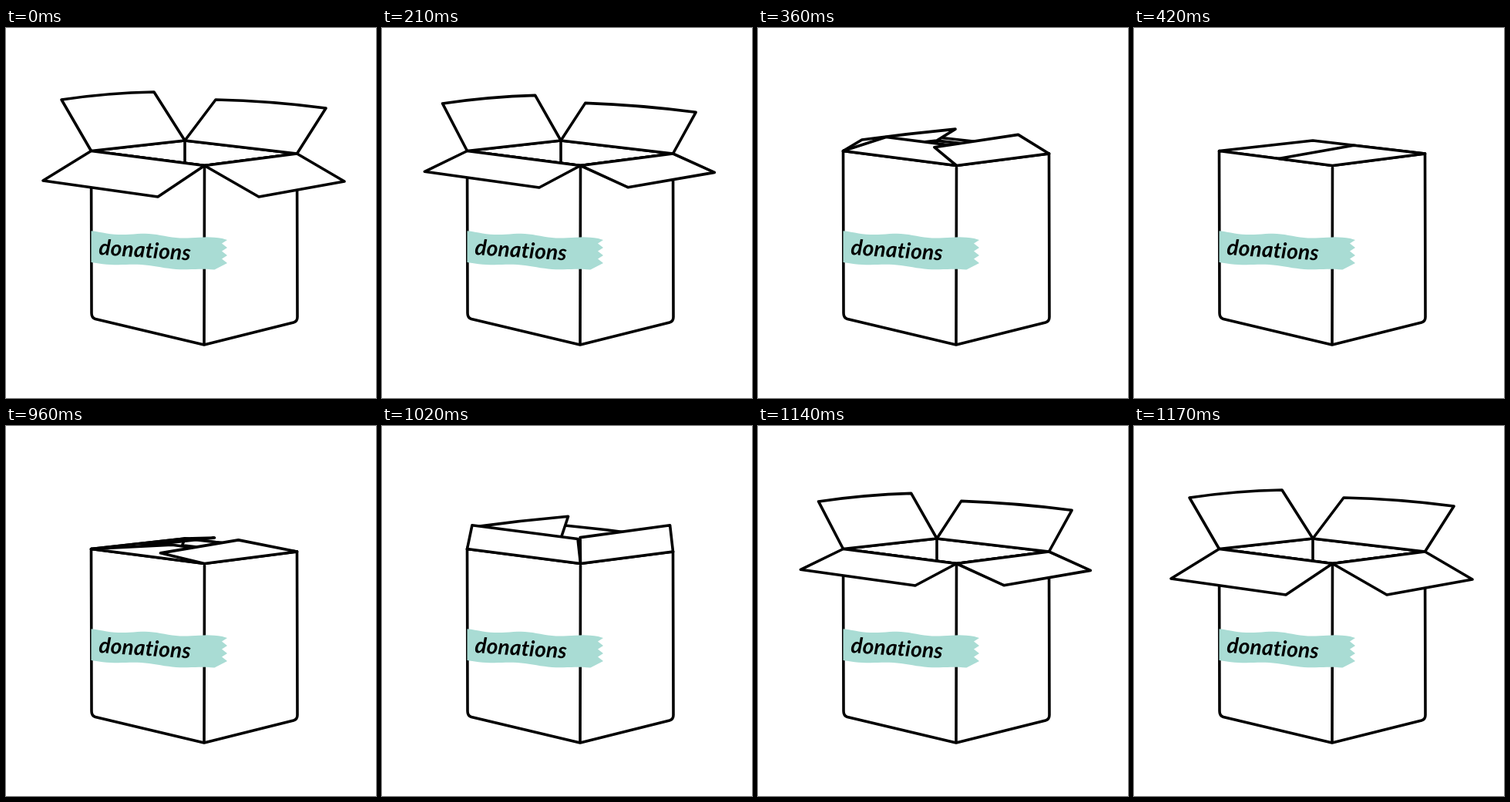
Write an HTML page that moves like this. It is 480 by 480 pixels and loops after 1350 ms.

```html
<!DOCTYPE html>
<html lang="en">
<head>
<meta charset="utf-8">
<title>Donation box</title>
<style>
  html, body { margin: 0; width: 100%; height: 100%; overflow: hidden; background: #fff; }
  svg { display: block; width: 100vw; height: 100vh; }
  .ink { fill: #fff; stroke: #000; stroke-width: 3.6; stroke-linejoin: round; stroke-linecap: round; }
  #label { fill: #a9dcd4; }
  text { font: italic 700 28px Lato, "Open Sans", sans-serif; font-variant-ligatures: none; letter-spacing: .2px; }
</style>
</head>
<body>
<svg viewBox="0 0 480 480">
  <path id="top" class="ink"/>
  <path id="corner" class="ink" d="M232 146 V200"/>
  <path id="backRight" class="ink"/>
  <path id="backLeft" class="ink"/>
  <path id="sides" class="ink"/>
  <path id="label"/>
  <text transform="translate(120 294) rotate(3.6)">donations</text>
  <path id="frontLeft" class="ink"/>
  <path id="frontRight" class="ink"/>
</svg>
<script>
const LOOP = 1350, STEP = 30, STEPS = 8, CLOSE_AT = 210, OPEN_AT = 960;

// Corners of the box top: left, back, right, front.
const A = [110.5, 159.5], B = [232, 146], C = [377.5, 163], D = [257.5, 178.5];

const el = id => document.getElementById(id);
const setPath = (id, d) => el(id).setAttribute("d", d);
const ease = x => x * x * (3 - 2 * x);
const mix = (p, q, t) => p.map((v, i) => v + (q[i] - v) * t);
const add = (p, q) => p.map((v, i) => v + q[i]);
const poly = points => "M" + points.join("L") + "Z";

// Folded corners: each hinge end slides towards the far side; the first may also be tucked inwards.
function folded([h, k], [farH, farK], depth, tuck = 0) {
  const edge = [mix(h, farH, depth[0]), mix(k, farK, depth[1])];
  return [mix(edge[0], edge[1], tuck), edge[1]];
}

// A flap moves from its open corners, through leaning upright, to folded.
function flap(hinge, far, { open, lean, depth, tuck, bow = 0 }) {
  const upright = hinge.map(p => add(p, lean));
  return { hinge, bow, poses: [open, upright, folded(hinge, far, depth, tuck)] };
}

const flaps = {
  backRight: flap([B, C], [A, D], { open: [[272, 93], [415, 104]], lean: [-13, -25], depth: [.53, .53], tuck: .43, bow: 4 }),
  backLeft: flap([A, B], [D, C], { open: [[72, 93], [192, 83]], lean: [3, -35], depth: [.31, .31], bow: 4 }),
  frontLeft: flap([A, D], [B, C], { open: [[48, 198], [197, 219]], lean: [-16, -36.5], depth: [.53, .53], tuck: .43 }),
  frontRight: flap([D, C], [A, B], { open: [[328, 219], [439, 199]], lean: [12.5, -38.5], depth: [.476, .635] })
};

function flapPath({ hinge, bow, poses }, step) {
  const half = STEPS / 2;
  const leg = step < half ? 0 : 1;
  const t = ease(step / half - leg);
  const [p, q] = [0, 1].map(i => mix(poses[leg][i], poses[leg + 1][i], t));
  const crest = add(mix(p, q, .5), [0, -bow * (1 - step / STEPS)]);
  return `M${hinge[0]} L${p} Q${crest} ${q} L${hinge[1]} Z`;
}

// A brush stroke: two wavy edges and a ragged right end.
function labelPath() {
  const left = 110.5, top = [], bottom = [], teeth = [];
  for (let x = 0; x <= 170; x += 5) {
    top.push([left + x, 264.5 + x * .055 + 1.6 * Math.sin(x / 13 - 1)]);
    if (x <= 160) bottom.unshift([left + x, 304 + x * .068 + 1.4 * Math.sin(x / 14)]);
  }
  for (let y = 275; y <= 305; y += 10) teeth.push([287, y], [280, y + 4.5]);
  teeth.pop();
  return poly([...top, ...teeth, ...bottom]);
}

// 0 is fully open, 8 fully closed.
function closedSteps(t) {
  const since = start => Math.max(0, Math.min(STEPS, Math.floor((t - start) / STEP) + 1));
  return since(CLOSE_AT) - since(OPEN_AT);
}

function draw(now) {
  const step = closedSteps(now % LOOP);
  const shut = step === STEPS;
  for (const id in flaps) {
    setPath(id, flapPath(flaps[id], step));
    el(id).style.display = shut && id !== "frontRight" ? "none" : "";
  }
  el("corner").style.display = shut ? "none" : "";
}

setPath("top", poly([A, B, C, D]));
setPath("sides", `M${A} L111 370 Q111 376 116 377.5 L257 411 L373 382 Q378 380.5 378 375 L${C} L${D} Z M${D} L257 411`);
setPath("label", labelPath());

const start = performance.now();
function tick() {
  draw(performance.now() - start);
  requestAnimationFrame(tick);
}
tick();
</script>
</body>
</html>
```
